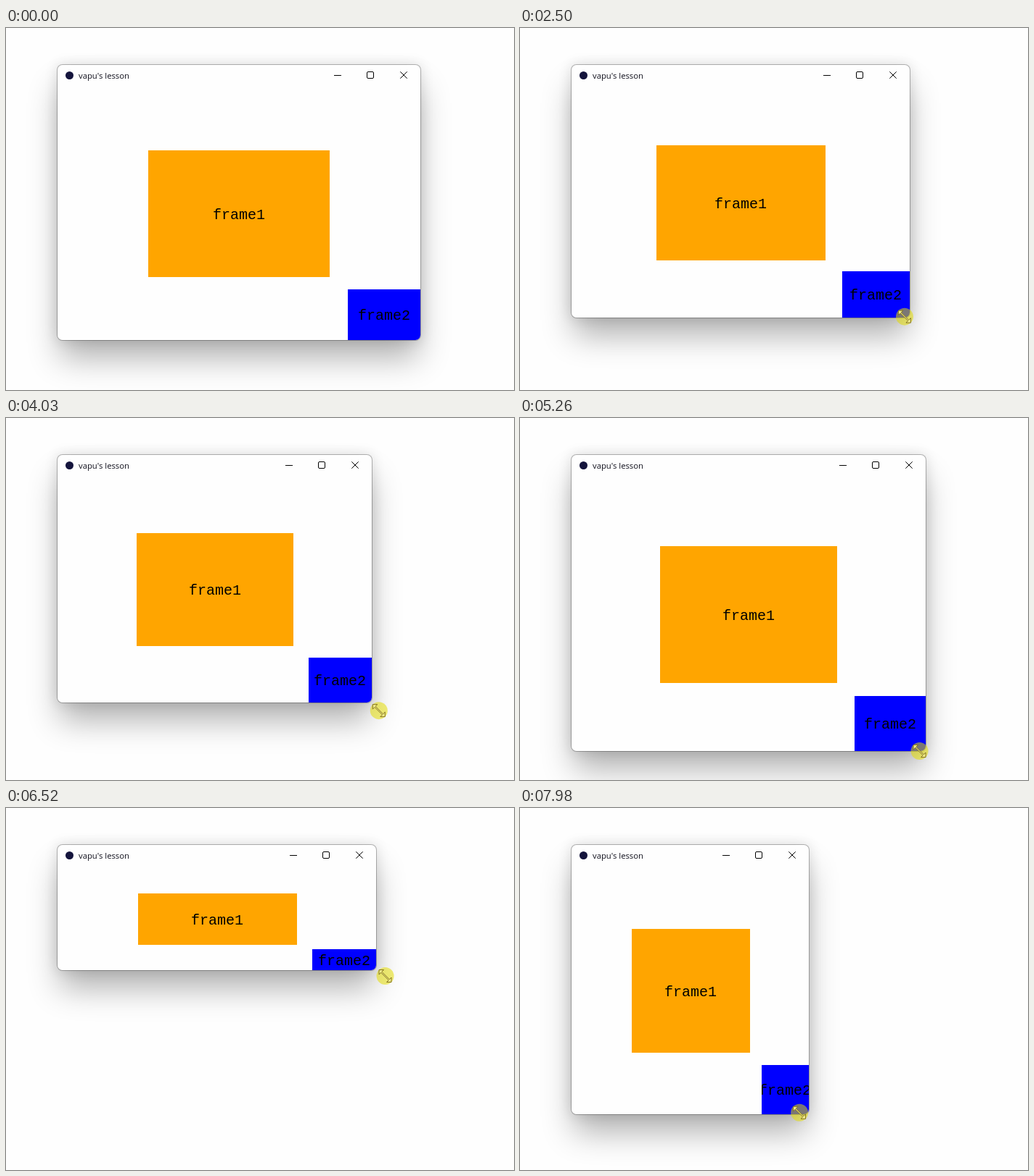
An HTML page that plays this animation: 700x500 px, repeating every 8000 ms.

```html
<!DOCTYPE html>
<html lang="en">
<head>
<meta charset="utf-8">
<title>Resizing window</title>
<style>
  html, body { margin: 0; width: 100%; height: 100%; overflow: hidden; background: #fefefe; }
  #win {
    position: absolute; left: 70px; top: 50px; box-sizing: border-box;
    border: 1px solid rgba(0, 0, 0, .27); border-radius: 8px; overflow: hidden;
    background: #fefefe padding-box;
    box-shadow: 0 28px 44px -4px rgba(0, 0, 0, .3), 0 0 18px rgba(0, 0, 0, .12);
  }
  #icon { position: absolute; left: 11px; top: 9px; width: 11px; height: 11px; border-radius: 50%; background: #14143c; }
  #title {
    position: absolute; left: 29px; top: 5px; line-height: 20px; white-space: nowrap;
    font-family: "Open Sans", "Noto Sans", sans-serif; font-size: 11.3px; color: #10101c;
  }
  #buttons { position: absolute; right: 0; top: 0; }
  .pane { position: absolute; overflow: hidden; }
  .pane span {
    position: absolute; line-height: 24px; white-space: pre; color: #000;
    font-family: "Liberation Mono", monospace; font-size: 20px;
  }
  #one { background: #ffa500; }
  #two { background: #00f; }
  #overlay { position: absolute; left: 0; top: 0; }
</style>
</head>
<body>
<div id="win">
  <div id="icon"></div>
  <div id="title">vapu's lesson</div>
  <svg id="buttons" width="130" height="30" fill="none" stroke="#000">
    <path d="M11 14.5h10"/>
    <rect x="56.5" y="9.5" width="9" height="9" rx="1.5"/>
    <path d="M102.3 9.3l9.4 9.4M111.7 9.3l-9.4 9.4"/>
  </svg>
  <div class="pane" id="one"><span>frame1</span></div>
  <div class="pane" id="two"><span>frame2</span></div>
</div>
<svg id="overlay" width="700" height="500">
  <g id="cursor">
    <circle r="12" fill="#e4dc00" fill-opacity=".54"/>
    <g fill="#efe98a" stroke="#84741c" stroke-linejoin="round">
      <path id="pointer" d="M0 0v15l3.6-3.4 2.6 6 2.4-1-2.6-5.8h5z"/>
      <path id="resize" d="M-8.5-8.5H-2L-4.7-5.8 5.8 4.7 8.5 2V8.5H2L4.7 5.8-5.8-4.7-8.5-2z"/>
    </g>
  </g>
</svg>
<script>
const LOOP = 8000, TICK = 70, LEFT = 71, TOP = 81;
const ENTER = 12, HOVER = 21, ARRIVE = 23;
const $ = id => document.getElementById(id);

// Drag path of the window's lower right corner: tick, x, y
const path = [
  [0, 571, 431], [31, 571, 431], [35, 537, 400],
  [47, 342, 280], [50, 342, 280], [57, 504, 393],
  [67, 584, 458], [70, 584, 458], [75, 559, 460],
  [85, 326, 299], [92, 490, 222], [100, 615, 318],
  [108, 535, 452], [114, 398, 423], [120, 290, 350]
];

const slope = (i, c) => path[i] && path[i + 1]
  ? (path[i + 1][c] - path[i][c]) / (path[i + 1][0] - path[i][0]) : 0;

// Speed at a point, weighted by the neighbouring spans; pauses start and end at rest
function speed(i, c) {
  const before = slope(i - 1, c), after = slope(i, c);
  if (!before || !after) return 0;
  const share = (path[i][0] - path[i - 1][0]) / (path[i + 1][0] - path[i - 1][0]);
  return before * (1 - share) + after * share;
}

function corner(tick) {
  const i = path.findIndex((p, n) => n && p[0] > tick) - 1;
  const p = path[i], q = path[i + 1], span = q[0] - p[0];
  const u = (tick - p[0]) / span, v = 1 - u;
  return [1, 2].map(c => p[c] * v * v * (1 + 2 * u) + q[c] * u * u * (1 + 2 * v)
    + span * u * v * (speed(i, c) * v - speed(i + 1, c) * u));
}

function place(id, x, y, w, h) {
  const pane = $(id), label = pane.firstChild;
  Object.assign(pane.style, { left: x + "px", top: y + 30 + "px", width: w + "px", height: h + "px" });
  label.style.left = Math.floor(w / 2) - 36 + "px";
  label.style.top = Math.round(h / 2) - 10 + "px";
}

function drawWindow(tick) {
  const [right, bottom] = corner(tick).map(Math.round);
  const W = right - LEFT, H = bottom - TOP;
  $("win").style.width = W + 2 + "px";
  $("win").style.height = H + 32 + "px";

  const w = Math.floor(W / 2), h = Math.floor(H / 2);
  place("one", Math.round(W / 2) - Math.floor(w / 2), Math.round(H / 2) - Math.floor(h / 2), w, h);
  const w2 = Math.round(W * .2), h2 = Math.round(H * .2);
  place("two", W - w2, H - h2, w2, h2);
}

// The pointer runs slightly ahead of the window it drags
function drawCursor(tick) {
  const [x, y] = corner(tick + .6);
  const away = Math.max(0, (ARRIVE - tick) / (ARRIVE - ENTER)) ** 2;
  $("cursor").setAttribute("transform", `translate(${x + 18 * away} ${y + 4 + 70 * away})`);
  $("cursor").style.display = tick < ENTER ? "none" : "";
  $("pointer").style.display = tick < HOVER ? "" : "none";
  $("resize").style.display = tick < HOVER ? "none" : "";
}

const begin = performance.now();
function draw() {
  const tick = Math.floor(((performance.now() - begin) % LOOP + 1) / TICK);
  drawWindow(tick);
  drawCursor(tick);
  requestAnimationFrame(draw);
}
draw();
</script>
</body>
</html>
```
